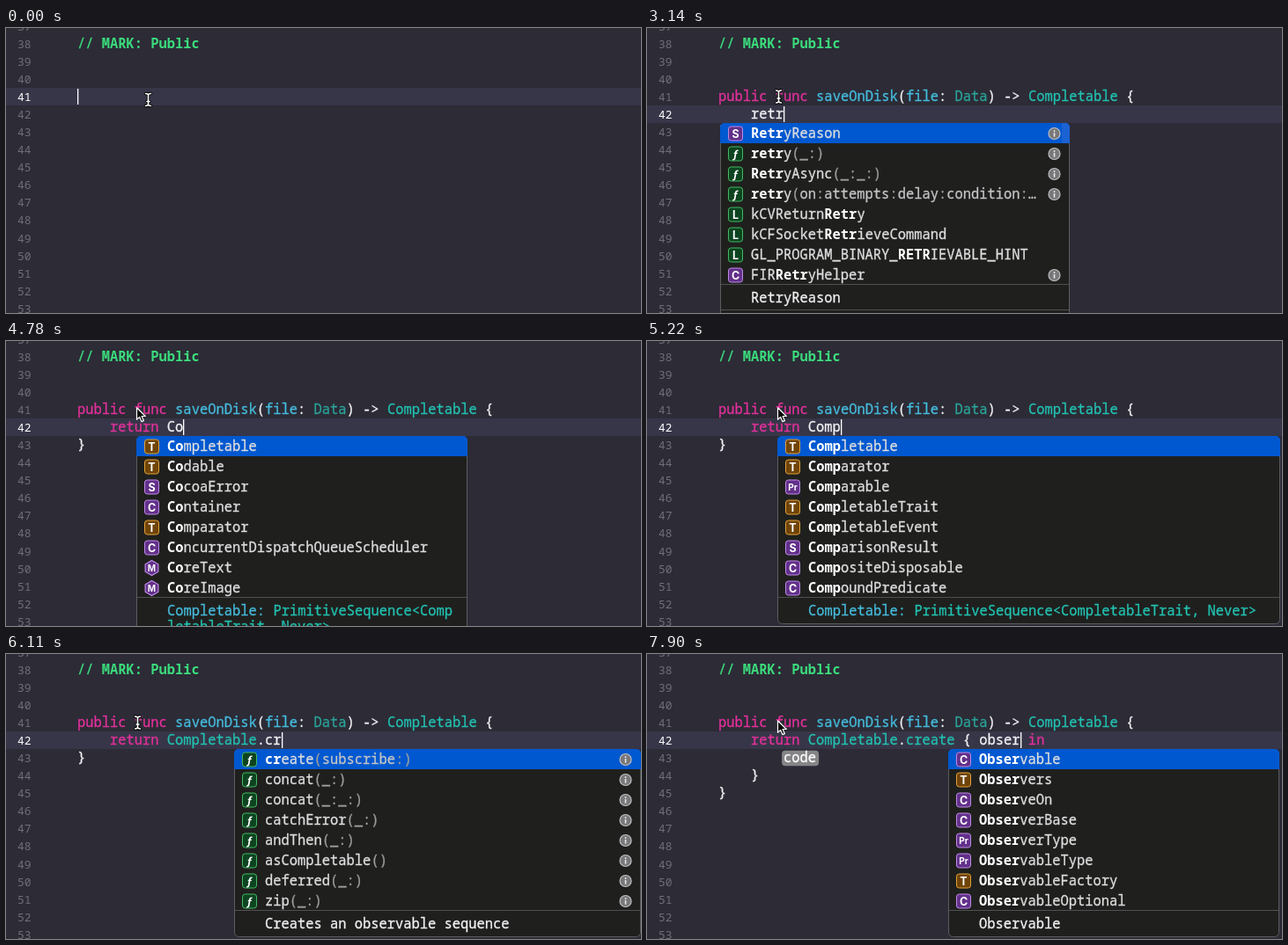
These frames come from a looping animation (721x324 px, 8 s). An HTML page with a canvas:

```html
<!DOCTYPE html>
<html lang="en">
<head>
<meta charset="utf-8">
<title>Code completion</title>
<style>
html, body { margin: 0; width: 100%; height: 100%; overflow: hidden; background: #2c2b36; }
canvas { display: block; }
</style>
</head>
<body>
<canvas id="stage" width="721" height="324"></canvas>
<script>
const ctx = document.getElementById('stage').getContext('2d');
const LOOP = 8000, LEFT = 81, CW = 9.26, PITCH = 20.07;
const MONO = '"Noto Sans Mono", "DejaVu Sans Mono", monospace';
const SANS = 'Inter, Roboto, sans-serif';
const CODE = '500 15.43px ' + MONO, BOLD = '700 15.43px ' + MONO;
const NUMBER = '500 13px ' + MONO;

const INK = {
  k: '#e2309a', f: '#45bbdc', t: '#22c1b1', d: '#2aa298', w: '#f2f2f4',
  g: '#3bdb7c', G: '#3bdb7c', P: '#ffffff', c: '#ffffff'
};
const PURPLE = ['#62308a', '#c08ae6'], GREEN = ['#0d4420', '#43b863'];
const KINDS = {
  S: PURPLE, C: PURPLE, M: PURPLE, Pr: PURPLE, f: GREEN, L: GREEN,
  T: ['#704408', '#e2a038'], K: ['#4a4a4e', '#a0a0a4']
};

// Lists: "kind name", a trailing * adds the info mark.
const LISTS = {
  ret: {
    col: 4, w: 397, scroll: true, more: true, foot: [['w|RetryReason']],
    items: ['S RetryReason*', 'f retry(_:)*', 'f RetryAsync(_:_:)*', 'f retry(on:attempts:delay:condition:…*',
      'L kCVReturnRetry', 'L kCFSocketRetrieveCommand', 'L GL_PROGRAM_BINARY_RETRIEVABLE_HINT', 'C FIRRetryHelper*']
  },
  retu: {
    col: 4, w: 397, foot: [['w|return']],
    items: ['K return', 'L kCVReturnRetry', 'L kCVReturnError', 'L kCVReturnSuccess', 'L kCVReturnLast',
      'L kCVReturnFirst', 'L kCVReturnUnsupported', 'L kCVReturnInvalidSize']
  },
  Co: {
    col: 11, w: 376, foot: [['f|Completable: ', 't|PrimitiveSequence<Comp'], ['t|letableTrait, Never>']],
    items: ['T Completable', 'T Codable', 'S CocoaError', 'C Container', 'T Comparator',
      'C ConcurrentDispatchQueueScheduler', 'M CoreText', 'M CoreImage']
  },
  Comp: {
    col: 11, w: 571, foot: [['f|Completable: ', 't|PrimitiveSequence<CompletableTrait, Never>']],
    items: ['T Completable', 'T Comparator', 'Pr Comparable', 'T CompletableTrait', 'T CompletableEvent',
      'S ComparisonResult', 'C CompositeDisposable', 'C CompoundPredicate']
  },
  dot: {
    col: 23, w: 462, foot: [['w|Completable']],
    items: ['f create(subscribe:)*', 'f concat(_:)*', 'f deferred(_:)*', 'f empty()*', 'f error(_:)*',
      'f merge(_:)*', 'f never()*', 'f zip(_:)*']
  },
  cr: {
    col: 23, w: 462, foot: [['w|Creates an observable sequence']],
    items: ['f create(subscribe:)*', 'f concat(_:)*', 'f concat(_:_:)*', 'f catchError(_:)*',
      'f andThen(_:)*', 'f asCompletable()*', 'f deferred(_:)*', 'f zip(_:)*']
  },
  obs: {
    col: 32, w: 376, foot: [['w|Observable']],
    items: ['C Observable', 'T Observers', 'C ObserveOn', 'C ObserverBase', 'Pr ObserverType',
      'Pr ObservableType', 'T ObservableFactory', 'C ObservableOptional']
  }
};

const SIG = ['k|public func ', 'f|saveOnDisk', 'w|(', 'f|file', 'w|: ', 'd|Data', 'w|) -> ', 't|Completable', 'w| {'];
const CLOSE = ['w|}'], CLOSE4 = ['w|    }'];

const line = (...parts) => [['w|    ', ...parts], CLOSE];
const typed = word => ({ body: line('w|' + word), col: 4 + word.length });
const after = (word, ink = 'w') => ({
  body: line('k|return', 'w| ', ...(word ? [ink + '|' + word] : [])), col: 11 + word.length
});
const member = word => ({
  body: line('k|return', 'w| ', 't|Completable', 'w|.', 'w|' + word), col: 23 + word.length
});
const closure = (arg, col) => ({
  body: [['w|    ', 'k|return', 'w| ', 't|Completable', 'w|.', 't|create', 'w| { ', arg, 'k| in'],
    ['w|        ', 'c|code'], CLOSE4, CLOSE], col
});
const arg = name => closure('w|' + name, 32 + name.length);
const pop = (list, q) => ({ list, q });
const BEAM = { mouse: 'beam' }, ARROW = { mouse: 'arrow' }, SHUT = { list: '' };

// Each step overrides the state before it.
const STEPS = [
  [0, { sig: 0, body: [], row: 41, col: 0, caret: true, mouse: 'beam', mx: 161, my: 81.5, list: '', q: '' }],
  [300, { sig: 22, col: 22, mx: 149, my: 78 }],
  [450, { sig: 34, col: 34 }],
  [590, { sig: 49, col: 49 }],
  [1190, { caret: false }],
  [1340, { sig: 50, col: 50, caret: true }],
  [1640, { sig: 51, col: 51 }],
  [1940, { row: 42, ...typed('') }],
  [2540, typed('r')],
  [2690, typed('re')],
  [2840, typed('ret')],
  [2990, { ...typed('ret'), ...pop('ret', 'ret') }],
  [3140, { ...typed('retr'), ...pop('ret', 'retr') }],
  [3290, { ...typed('retu'), ...pop('retu', 'retu'), ...ARROW }],
  [3440, { ...typed('retur'), ...pop('retu', 'retur') }],
  [3590, { body: line('k|return'), col: 10, ...pop('retu', 'return'), wide: 19 }],
  [3890, { ...SHUT, wide: 0 }],
  [4030, after('')],
  [4480, { ...after('C'), ...BEAM }],
  [4630, pop('Co', 'C')],
  [4780, { ...after('Co'), ...pop('Co', 'Co'), ...ARROW }],
  [4930, { ...after('Com'), ...pop('Comp', 'Com') }],
  [5080, { ...after('Comp'), ...pop('Comp', 'Comp') }],
  [5230, { ...after('Compl'), ...pop('Comp', 'Compl') }],
  [5380, { ...after('Completable', 't'), ...SHUT }],
  [5520, member('')],
  [5670, { ...pop('dot', ''), ...BEAM }],
  [5960, { ...member('c'), ...pop('cr', 'c') }],
  [6110, { ...member('cr'), ...pop('cr', 'cr') }],
  [6260, {
    body: line('k|return', 'w| ', 't|Completable', 'w|.', 't|create', 'w|(', 't|subscribe', 'w|: ',
      'P|(@escaping Observer) -> Void', 'w|)'),
    row: 0, caret: false, ...SHUT
  }],
  [6860, closure('P|(CompletableObserver)', 32)],
  [7160, { ...arg('o'), row: 42, caret: true }],
  [7460, arg('ob')],
  [7610, { ...arg('obs'), ...pop('obs', 'obs') }],
  [7760, { ...arg('obse'), ...pop('obs', 'obse'), ...ARROW }],
  [7900, { ...arg('obser'), ...pop('obs', 'obser') }]
];

const stateAt = t => STEPS.reduce((s, [at, part]) => at <= t ? Object.assign(s, part) : s, {});
const rowY = n => 78 + (n - 41) * PITCH;

function box(x, y, w, h, r, fill, stroke) {
  ctx.beginPath();
  ctx.roundRect(x, y, w, h, r);
  if (fill) { ctx.fillStyle = fill; ctx.fill(); }
  if (stroke) { ctx.strokeStyle = stroke; ctx.lineWidth = 1; ctx.stroke(); }
}

function write(text, x, y, color, font = CODE) {
  ctx.font = font;
  ctx.fillStyle = color;
  ctx.fillText(text, x, y);
  if (font !== CODE) return;
  // A hairline gives code its medium weight.
  ctx.strokeStyle = color;
  ctx.lineWidth = 0.3;
  ctx.strokeText(text, x, y);
}

// Draws "ink|text" parts, cut after max characters.
function run(parts, x, mid, max = 999) {
  for (const part of parts) {
    const ink = part[0], text = part.slice(2, 2 + max);
    const w = text.length * CW;
    if (ink === 'P') box(x - 1, mid - 8.5, w + 2, 17, 4, '#456fbd');
    if (ink === 'c') box(x - 2, mid - 8.5, w + 5, 17.5, 4, '#858587');
    write(text, x, mid + 5, INK[ink], ink === 'G' ? BOLD : CODE);
    x += w;
    max -= text.length;
    if (max <= 0) break;
  }
}

function icon(kind, x, y) {
  const [fill, edge] = KINDS[kind];
  if (kind === 'M') {
    ctx.beginPath();
    for (let i = 0; i < 6; i++) {
      const a = Math.PI * (i / 3 + 1 / 6);
      ctx.lineTo(x + 8.5 * Math.cos(a), y + 8.5 * Math.sin(a));
    }
    ctx.closePath();
    ctx.fillStyle = fill;
    ctx.fill();
    ctx.strokeStyle = edge;
    ctx.lineWidth = 1.2;
    ctx.stroke();
  } else box(x - 8, y - 8, 16, 16, 3, fill, edge);
  const size = kind === 'Pr' || kind === 'M' ? 10 : 12.5;
  ctx.textAlign = 'center';
  write(kind === 'f' ? 'ƒ' : kind, x, y + size * 0.37, '#fff',
    `${kind === 'f' ? 'italic ' : ''}700 ${size}px ${SANS}`);
  ctx.textAlign = 'left';
}

function info(x, y) {
  ctx.beginPath();
  ctx.arc(x, y, 6.5, 0, 7);
  ctx.fillStyle = '#78787a';
  ctx.fill();
  ctx.strokeStyle = '#c0c0c2';
  ctx.lineWidth = 1.2;
  ctx.stroke();
  ctx.fillStyle = '#e6e6e8';
  ctx.fillRect(x - 0.8, y - 3.8, 1.6, 1.8);
  ctx.fillRect(x - 0.8, y - 1, 1.6, 4.6);
}

function entry(name, q, x, y) {
  const hit = q ? name.toLowerCase().indexOf(q.toLowerCase()) : -1;
  const paren = name.indexOf('(');
  const end = paren < 0 ? name.length : paren;
  const put = (a, b, color, font) => write(name.slice(a, b), x + a * CW, y + 5, color, font);
  const from = Math.max(hit, 0), to = hit < 0 ? 0 : hit + q.length;
  put(0, from, '#dededf');
  put(from, to, '#fff', BOLD);
  put(to, end, '#dededf');
  for (const part of name.slice(end).matchAll(/[(_:)]+|[^(_:)]+/g)) {
    const at = end + part.index;
    put(at, at + part[0].length, /[(_:)]/.test(part[0]) ? '#9d9d9e' : '#c4c4c6');
  }
}

function popup({ list, q, wide = 0 }) {
  const { col, w: base, items, foot, scroll, more } = LISTS[list];
  const w = base + wide, x = Math.round(LEFT + col * CW) - 35;
  const rows = foot.length + (more ? 1 : 0);
  const rule = y => {
    ctx.fillStyle = '#4f5052';
    ctx.fillRect(x + 1, y, w - 2, 1);
  };
  box(x + 0.5, 108.5, w - 1, 193 + 20 * rows, 5, '#1f201e', '#5c5d60');
  box(x, 108, w, 23, [5, 5, 0, 0], '#0058d0');
  if (scroll) box(x + w - 9, 108, 9, 23, [0, 5, 0, 0], '#1b62d2');
  items.forEach((item, i) => {
    const y = 120 + i * 23, cut = item.indexOf(' ');
    icon(item.slice(0, cut), x + 17.5, y);
    entry(item.slice(cut + 1).replace('*', ''), q, x + 35, y);
    if (item.endsWith('*')) info(x + w - 17.5, y);
  });
  rule(291);
  if (more) rule(320);
  foot.forEach((parts, i) => run(parts, x + 35, 307 + i * 18));
}

function pointer({ mouse, mx, my }) {
  ctx.save();
  ctx.lineJoin = ctx.lineCap = 'round';
  if (mouse === 'beam') {
    ctx.translate(mx + 0.5, my);
    const path = new Path2D('M-3-7Q0-7 0-5Q0-7 3-7M0-5V5M-3 7Q0 7 0 5Q0 7 3 7M-1.5 2H1.5');
    ctx.strokeStyle = '#000';
    ctx.lineWidth = 3.4;
    ctx.stroke(path);
    ctx.strokeStyle = '#fff';
    ctx.lineWidth = 1.6;
    ctx.stroke(path);
  } else {
    ctx.translate(148.5, 75.8);
    const path = new Path2D('M0 0V13.5L3.2 10.6L5.4 15.8L7.8 14.8L5.6 9.7H9.8Z');
    ctx.fillStyle = '#000';
    ctx.fill(path);
    ctx.strokeStyle = '#fff';
    ctx.lineWidth = 1.2;
    ctx.stroke(path);
  }
  ctx.restore();
}

function draw(t) {
  const s = stateAt(t);
  ctx.fillStyle = '#2c2b36';
  ctx.fillRect(0, 0, 721, 324);
  if (s.row) {
    ctx.fillStyle = '#373648';
    ctx.fillRect(0, 68 + (s.row - 41) * 20, 721, 20);
  }
  ctx.textAlign = 'right';
  for (let n = 37; n <= 53; n++) {
    write(n, 28.5, rowY(n) + 5, n === s.row ? '#fff' : '#6f6f7a', NUMBER);
  }
  ctx.textAlign = 'left';
  run(['g|// ', 'G|MARK: Public'], LEFT, rowY(38));
  if (s.sig) run(SIG, LEFT, rowY(41), s.sig);
  s.body.forEach((parts, i) => run(parts, LEFT, rowY(42 + i)));
  if (s.caret) {
    ctx.fillStyle = '#fff';
    ctx.fillRect(Math.round(LEFT + s.col * CW), 69 + (s.row - 41) * 20, 1.3, 18);
  }
  if (s.list) popup(s);
  pointer(s);
}

function tick() {
  draw(performance.now() % LOOP);
  requestAnimationFrame(tick);
}
tick();
</script>
</body>
</html>
```
